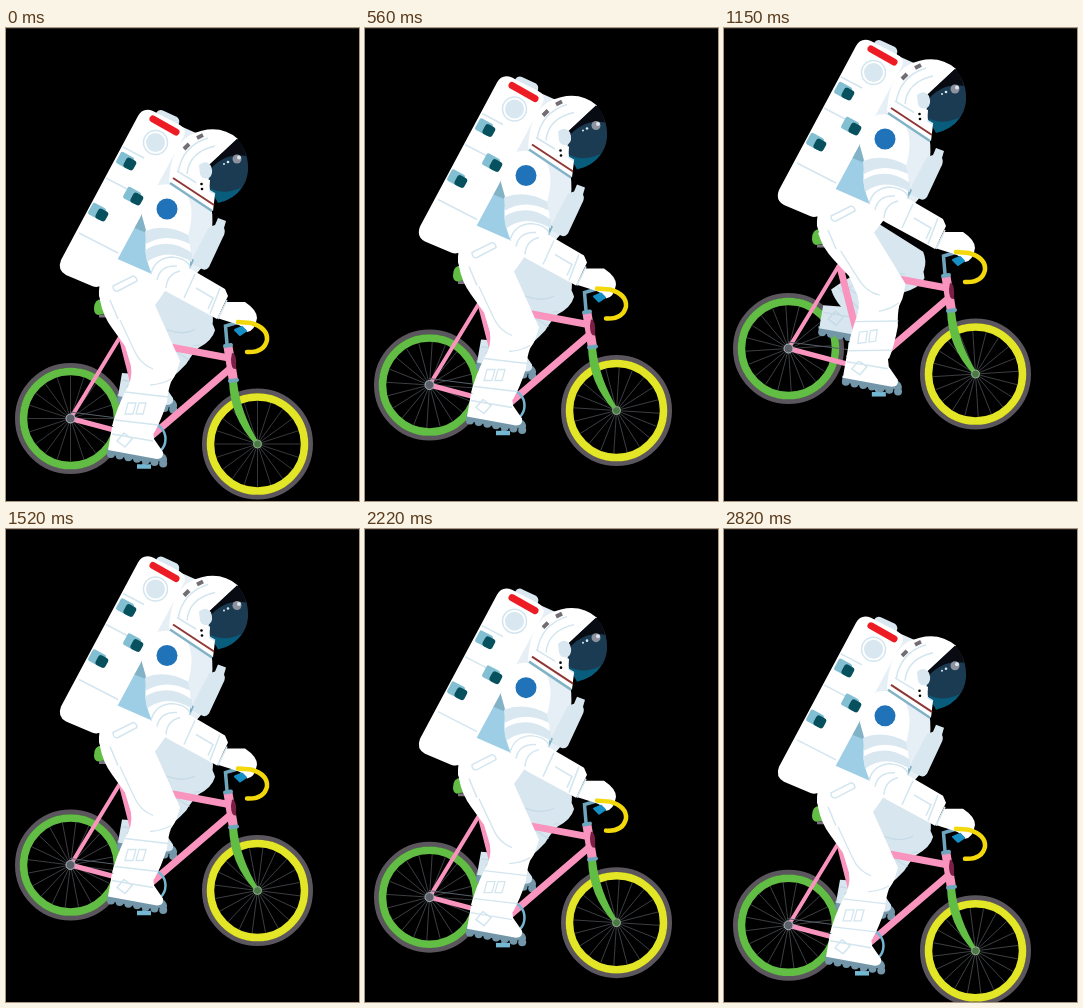
An HTML page for the animation above (2.92 s loop, 353 by 473 pixels).

```html
<!DOCTYPE html>
<html lang="en">
<head>
<meta charset="utf-8">
<title>Cycling astronaut</title>
<style>
  html, body { margin: 0; width: 100%; height: 100%; overflow: hidden; background: #000; }
  svg { display: block; width: 100vw; height: 100vh; }
  .pink { fill: none; stroke: #f994be; stroke-linecap: round; }
  .steel { fill: none; stroke: #6fa6bd; stroke-linecap: round; }
  .seam { fill: none; stroke: #d3e6ef; stroke-width: 1.5; }
  .pale { fill: #d9e7f0; }
  .white { fill: #fff; }
</style>
</head>
<body>
<svg viewBox="0 0 353 473" preserveAspectRatio="none">
  <rect width="353" height="473"/>
  <rect width="353" height="1" fill="#222"/>
  <g id="rider">
    <g id="wheels"></g>

    <!-- saddle -->
    <path d="M93 288H104M103 291L112 290L116 308" fill="none" stroke="#77727c" stroke-width="3"/>
    <path d="M88 281Q88 271 96 271Q103 272 106 282L107 288Q98 285 92 287Q88 286 88 281Z" fill="#62bd45"/>

    <g id="farCrank"></g>
    <g id="farLeg"></g>

    <!-- frame -->
    <path class="pink" stroke-width="4" d="M64.500 390.500L114 309"/>
    <path class="pink" stroke-width="5" d="M64.500 390.500L142 411"/>
    <path class="pink" stroke-width="7" d="M116 309L142 411L226 339M116 310L223 330"/>
    <path d="M64 384L143 394" stroke="#56606a" stroke-width="1"/>
    <circle cx="64.500" cy="390.500" r="4.500" fill="#5d6069" stroke="#a9b5bd"/>
    <path d="M223 353Q224 389 249 416L253 415Q234 384 231 353Z" fill="#62bd45"/>
    <path d="M217.500 319L226.500 318L232 352L223 354Z" fill="#f994be"/>
    <path d="M226 325Q231 325 230 341Q225 342 225 331Z" fill="#7a1f45"/>
    <path class="steel" stroke-width="4" d="M219 318L225 317M224 353L231 352"/>
    <path class="steel" stroke-width="3.500" d="M221 316L219.500 298L233 294"/>
    <circle cx="251.500" cy="416" r="4" fill="#4c7a46" stroke="#8fae8a"/>

    <!-- chainring -->
    <circle cx="143" cy="411" r="16.500" fill="none" stroke="#74b7d2" stroke-width="2.500"/>
    <circle cx="143" cy="411" r="5" fill="#74b7d2"/>
    <g id="nearCrank"></g>

    <!-- torso -->
    <path d="M172 97L190 105L204 172Q211 200 198 237L180 258L120 258L112 215L150 130Z" fill="#e6eff5"/>
    <path d="M128 190L147 196L150 254L104 232Z" fill="#9dcee5"/>
    <path d="M133 184L142 188L143 206L126 199Z" fill="#82b2c6"/>
    <path class="pale" d="M212 190L220 193L218 200Q220 204 217 209L203 239Q200 243 196 241L184 235L203 199L209 197Z"/>
    <path d="M181 228L188 232L184 241L176 237Z" fill="#82b2c6"/>

    <!-- life support pack -->
    <path class="pale" d="M150 85Q153 80 158 83L171 89Q175 92 172 98Z"/>
    <path class="white" d="M132 88Q137 79 147 83L174 97Q182 102 177 110L102 249Q96 262 86 258L60 247Q51 242 55 232Z"/>
    <path d="M147 91L170 104" stroke="#ed1c24" stroke-width="7" stroke-linecap="round"/>
    <circle class="pale" cx="149.500" cy="114.500" r="9.500"/>
    <circle class="seam" cx="149.500" cy="114.500" r="12"/>
    <path class="seam" d="M73 205L112 225M117 119L138 130M100 150L121 161"/>
    <g id="latches"></g>

    <g id="nearLeg"></g>
    <path class="white" d="M107 229Q92 246 93 268Q95 278 104 280L130 286L149 276L166 254L148 247Z"/>
    <path class="seam" d="M107 258L127 248Q131 249 131 253L112 263Q107 264 107 258ZM104 272L112 291"/>

    <!-- arm -->
    <path class="white" d="M153 157Q137 163 136 188L141 206Q136 226 147 248Q151 259 163 265L211 291L222 268L219 261L183 240Q187 226 182 208Q189 183 182 169Q174 153 153 157Z"/>
    <path class="pale" d="M139 203Q160 195 182 207L184 216Q160 204 140 216ZM139 222Q162 208 186 225L186 234Q161 219 141 234Z"/>
    <path class="seam" d="M145 246Q149 230 166 229Q183 231 184 240M151 252Q154 237 171 238M160 260Q161 246 174 243M189 246L178 270M214 260L204 286M190 260L207 270L202 281"/>
    <path class="white" d="M220 274L239 274Q251 282 251 290Q249 303 241 304Q237 298 230 296L211 290Z"/>
    <path class="seam" d="M221 272L212 291"/>
    <circle cx="161" cy="181" r="10.500" fill="#2173b9"/>

    <!-- helmet -->
    <path class="white" d="M163 153Q165 118 184 107Q212 94 232 111L210 132L206 181Z"/>
    <path d="M231 111Q243 124 242 143Q240 164 218 173Q205 173 203 157L202 138Z" fill="#1b3b53"/>
    <path d="M231 111Q238 118 240 128Q218 124 202 144V138Z" fill="#080b12"/>
    <path d="M204 160Q219 168 236 159Q229 171 212 175Z" fill="#075d7b"/>
    <circle cx="231" cy="131" r="4.500" fill="#8e929e"/>
    <circle cx="233" cy="129.500" r="2" fill="#dde3ea"/>
    <circle cx="222" cy="134" r="1.300" fill="#dceaf1"/>
    <circle cx="218" cy="136" r="1" fill="#dceaf1"/>
    <path class="seam" d="M172 145Q176 118 202 110M181 146Q183 124 209 118"/>
    <path d="M178 121L183 116M191 110L197 107" stroke="#716d72" stroke-width="4"/>
    <path class="pale" d="M193 137Q200 131 205 138Q208 146 203 150Q196 152 194 146Z"/>
    <path class="white" d="M170 142L209 166L207 183L163 155Z"/>
    <path d="M167 150L208 177" stroke="#8f3634" stroke-width="2"/>
    <path d="M164 155L206 183" stroke="#82b2c6" stroke-width="2.500"/>
    <path class="seam" d="M171 143L209 166"/>
    <path class="white" d="M189 150L204 152L203 168L192 162Z"/>
    <circle cx="195.500" cy="156" r="1.300"/>
    <circle cx="196" cy="161" r="1.300"/>

    <!-- handlebar -->
    <path d="M229 302L236 299L240 303L234 307Z" fill="#168fc6" stroke="#168fc6" stroke-width="2" stroke-linejoin="round"/>
    <path d="M232 294L245 295Q262 300 261 312Q258 325 241 324" fill="none" stroke="#f3d90c" stroke-width="4.500" stroke-linecap="round"/>
  </g>
</svg>
<script>
const $ = id => document.getElementById(id);

const wheel = (x, y, rim) => {
  let spokes = "";
  for (let i = 0; i < 20; i++) {
    const a = i * Math.PI / 10;
    spokes += `M0 0L${(43 * Math.cos(a)).toFixed(1)} ${(43 * Math.sin(a)).toFixed(1)}`;
  }
  return `<g transform="translate(${x} ${y})" fill="none">
    <circle r="53" stroke="#5b555d" stroke-width="5"/>
    <circle r="47" stroke="${rim}" stroke-width="7.500"/>
    <path class="spokes" d="${spokes}" stroke="#6c7177" stroke-width=".5"/></g>`;
};
$("wheels").innerHTML = wheel(64.5, 390.5, "#62bd45") + wheel(251.5, 416, "#e3e527");

$("latches").innerHTML = [[121, 134], [128, 169], [93, 185]].map(([x, y]) =>
  `<g transform="translate(${x} ${y}) rotate(28)">
    <rect x="-10" y="-7" width="15" height="13" rx="2" fill="#83bfd3"/>
    <rect x="-2" y="-5" width="11" height="11" rx="3" fill="#07515f"/></g>`).join("");

const leg = (fill, line) => {
  let treads = "";
  for (let i = 0; i < 7; i++) treads += `<circle cx="${105 + i * 8.7}" cy="${426 + i * 1.6}" r="4"/>`;
  return `<g fill="${fill}">
    <g class="foot"><g fill="#7397a9">${treads}<path d="M101 420L148 421Q162 425 161 433L140 434L102 426Z"/></g>
      <path d="M106 399L147 402L148 411L157 424Q158 431 151 431L102 422Z"/>
      <path d="M106 406L147 413M118 405L126 411L119 419L111 413Z" fill="none" stroke="${line}" stroke-width="1.500"/></g>
    <g class="shin"><path d="M125 338Q127 352 119 364Q111 380 106 398Q122 409 148 405Q155 393 161 374Q162 362 165 354Q174 342 172 331Q160 318 140 320Z"/>
      <path d="M122 375H130L127 386H119ZM133 375H140L137 386H130ZM119 364L162 369M144 357Q157 356 165 351M109 392L152 397"
        fill="none" stroke="${line}" stroke-width="1.300"/></g>
    <g class="thigh"><path d="M94 272Q97 288 106 300L119 318L125 338Q130 352 145 355Q170 353 174 333L162 306L149 277Q158 266 160 258Q130 245 108 254Z"/>
      <path d="M114 292L128 322Q134 336 147 341" fill="none" stroke="${line}" stroke-width="1.300"/></g></g>`;
};
$("farLeg").innerHTML = leg("#d8e6ef", "#c6dbe6");
$("nearLeg").innerHTML = leg("#fff", "#d3e6ef");

const crank = `<path class="steel" stroke="#74b7d2" stroke-width="4" d="M143 411L138 438"/>`;
const pedal = `<path d="M131 438.500H145" stroke="#74b7d2" stroke-width="4.500"/>`;
for (const side of ["far", "near"])
  $(side + "Crank").innerHTML = `<g class="arm">${crank}</g><g class="pedal">${pedal}</g>`;

// Two-bone leg, knee forward
const hip = [122, 272], ankle = [131, 402], bone = 69, deg = 180 / Math.PI;
function bend(dx, dy) {
  const x = ankle[0] + dx - hip[0], y = ankle[1] + dy - hip[1];
  const d = Math.min(Math.hypot(x, y), 2 * bone);
  const thigh = Math.atan2(y, x) - Math.acos(d / (2 * bone));
  const kx = hip[0] + bone * Math.cos(thigh), ky = hip[1] + bone * Math.sin(thigh);
  const shin = Math.atan2(hip[1] + y - ky, hip[0] + x - kx);
  return { thigh: thigh * deg, shin: shin * deg, kx, ky };
}
const rest = bend(0, 0);

function poseLeg(side, turn) {
  const c = Math.cos(turn / deg), s = Math.sin(turn / deg);
  const dx = -5 * c - 27 * s + 5, dy = -5 * s + 27 * c - 27;
  const p = bend(dx, dy);
  const move = `translate(${dx} ${dy})`;
  const set = (group, part, value) => $(side + group).querySelector(part).setAttribute("transform", value);
  set("Leg", ".foot", move);
  set("Leg", ".thigh", `rotate(${p.thigh - rest.thigh} ${hip})`);
  set("Leg", ".shin", `translate(${p.kx} ${p.ky}) rotate(${p.shin - rest.shin}) translate(${-rest.kx} ${-rest.ky})`);
  set("Crank", ".arm", `rotate(${turn} 143 411)`);
  set("Crank", ".pedal", move);
}

function lerp(keys, x) {
  const i = Math.max(1, keys.findIndex(k => k[0] >= x));
  const [x0, y0] = keys[i - 1], [x1, y1] = keys[i];
  return y0 + (y1 - y0) * (x - x0) / (x1 - x0);
}

// Steps are quicker while climbing: [count, ms]
const pace = [[2, 100], [3, 70], [5, 50], [8, 70], [17, 100]];
const starts = [];
let total = 0;
for (const [n, ms] of pace)
  for (let i = 0; i < n; i++, total += ms) starts.push(total);

const height = [[0, 0], [8, -33.5], [9, -39], [13, -59], [17, -70], [18, -69], [21, -54.5],
  [23, -48], [25, -38.5], [29, -17], [30, -11.7], [34, 5.8], [35, 0]];
const pedalling = [[0, 0], [100, 0], [560, 360], [870, 540], [1220, 720], [2920, 720]];
const spokes = document.querySelectorAll(".spokes");

function draw(now) {
  const t = now % total;
  let step = starts.length - 1;
  while (starts[step] > t) step--;
  const turn = lerp(pedalling, starts[step]);
  $("rider").setAttribute("transform", `translate(0 ${lerp(height, step)})`);
  spokes.forEach(s => s.setAttribute("transform", `rotate(${step * 7.2})`));
  poseLeg("near", turn);
  poseLeg("far", turn + 180);
}

const begin = performance.now();
function tick() {
  draw(performance.now() - begin);
  requestAnimationFrame(tick);
}
tick();
</script>
</body>
</html>
```
